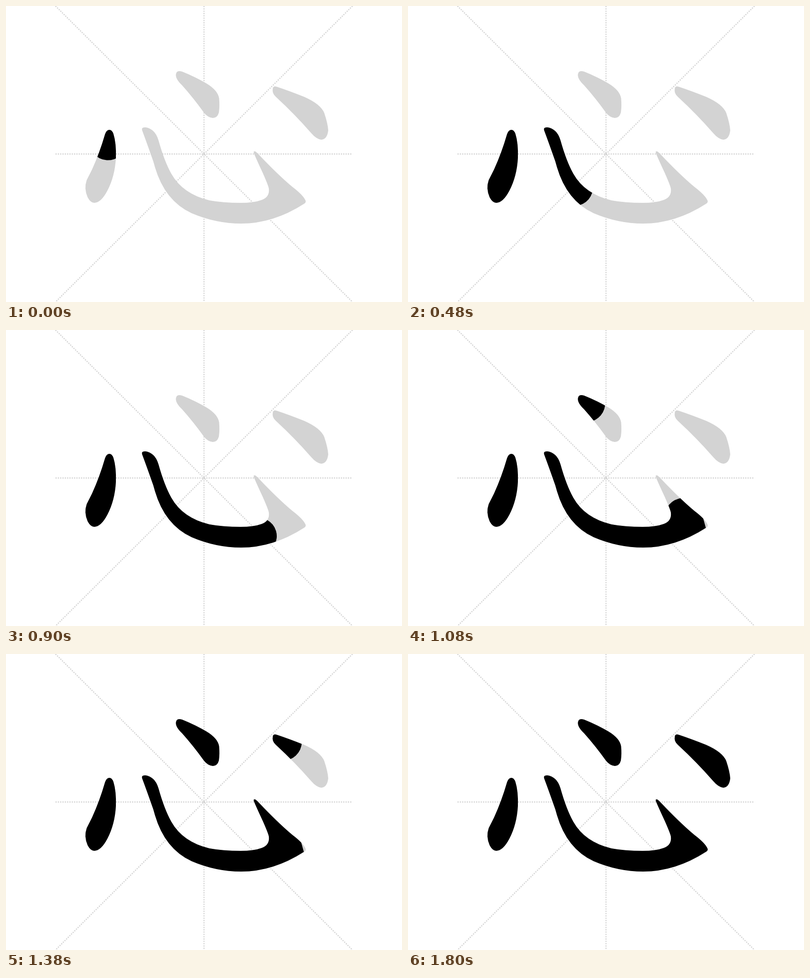
Animation of 800 by 600 pixels, one loop 1.86 s. Source, as an HTML page with a canvas:

```html
<!DOCTYPE html>
<html lang="en">
<head>
<meta charset="utf-8">
<title>Stroke order</title>
<style>
html, body { margin: 0; width: 100%; height: 100%; overflow: hidden; background: #fff; }
canvas { display: block; }
</style>
</head>
<body>
<canvas id="stage" width="800" height="600"></canvas>
<script>
const ctx = document.getElementById('stage').getContext('2d');
const LOOP = 1860, STEP = 60;
const UNIT = 600 / 1024;
const BRUSH = 128 * UNIT;
const GRAY = '#d3d3d3';

// shape: outline; spine: brush path; start in ms; speed in px per ms
const strokes = [
  {
    shape: 'M200 260Q203 251 209 251Q214 251 217 259Q223 278 222 308Q220 345 205 374' +
      'Q192 399 178 399Q171 399 165 388Q157 370 163 353Q168 343 174 331Q189 298 200 260Z',
    spine: 'M207 262L205 290L195 337L180 385',
    start: -50, speed: 0.2625
  },
  {
    shape: 'M275 252Q273 245 282 246Q290 247 297 253Q304 259 308 272Q320 315 334 340' +
      'Q357 381 411 394Q438 399 474 399Q501 399 517 393Q533 387 531 370Q530 364 519 339' +
      'Q506 311 501 299Q499 293 504 295Q506 296 521 312Q556 348 579 367Q600 383 605 394' +
      'Q607 398 602 401Q540 441 475 441Q424 441 375 420Q321 395 301 327Q298 315 293 302' +
      'Q285 279 275 252Z',
    spine: 'M282 252L293 270L303 305L322 350L350 385L405 411L455 419L509 418' +
      'L563 402L555 373L530 335L507 300',
    start: 192, speed: 0.448
  },
  {
    shape: 'M344 136Q346 130 356 133Q383 144 405 157Q428 171 430.5 187Q432 203 430 216' +
      'Q427 227 418 227Q407 226 399 215Q379 187 356 161Q340 146 344 136Z',
    spine: 'M350 140L396 179L418 212',
    start: 1025, speed: 0.255
  },
  {
    shape: 'M539 167Q540 161 548 164Q572 172 602 184Q636 199 643 217Q650 238 651 252' +
      'Q649 270 637 271Q627 270 616 257Q583 219 545 184Q537 177 539 167Z',
    spine: 'M545 168L599 206L636 260',
    start: 1311, speed: 0.265
  }
];
for (const s of strokes) {
  s.shape = new Path2D(s.shape);
  s.spine = new Path2D(s.spine);
}

const guides = new Path2D('M100 0L700 600M700 0L100 600M400 0V600M100 300H700');

function drawGuides() {
  ctx.lineCap = 'butt';
  ctx.lineWidth = 4 * UNIT;
  ctx.strokeStyle = GRAY;
  ctx.setLineDash([4 * UNIT, 4 * UNIT]);
  ctx.stroke(guides);
}

function brush(s, length) {
  ctx.save();
  ctx.clip(s.shape);
  ctx.lineCap = 'round';
  ctx.lineWidth = BRUSH;
  ctx.strokeStyle = '#000';
  ctx.setLineDash([length, 2000]);
  ctx.stroke(s.spine);
  ctx.restore();
}

function draw(t) {
  const done = t >= LOOP - STEP;
  ctx.fillStyle = '#fff';
  ctx.fillRect(0, 0, 800, 600);
  drawGuides();
  for (const s of strokes) {
    ctx.fillStyle = done ? '#000' : GRAY;
    ctx.fill(s.shape);
    const length = (t - s.start) * s.speed;
    if (!done && length > 0) brush(s, length);
  }
}

const begin = performance.now();
function tick() {
  const t = (performance.now() - begin) % LOOP;
  draw(Math.floor(t / STEP) * STEP);
  requestAnimationFrame(tick);
}
tick();
</script>
</body>
</html>
```
